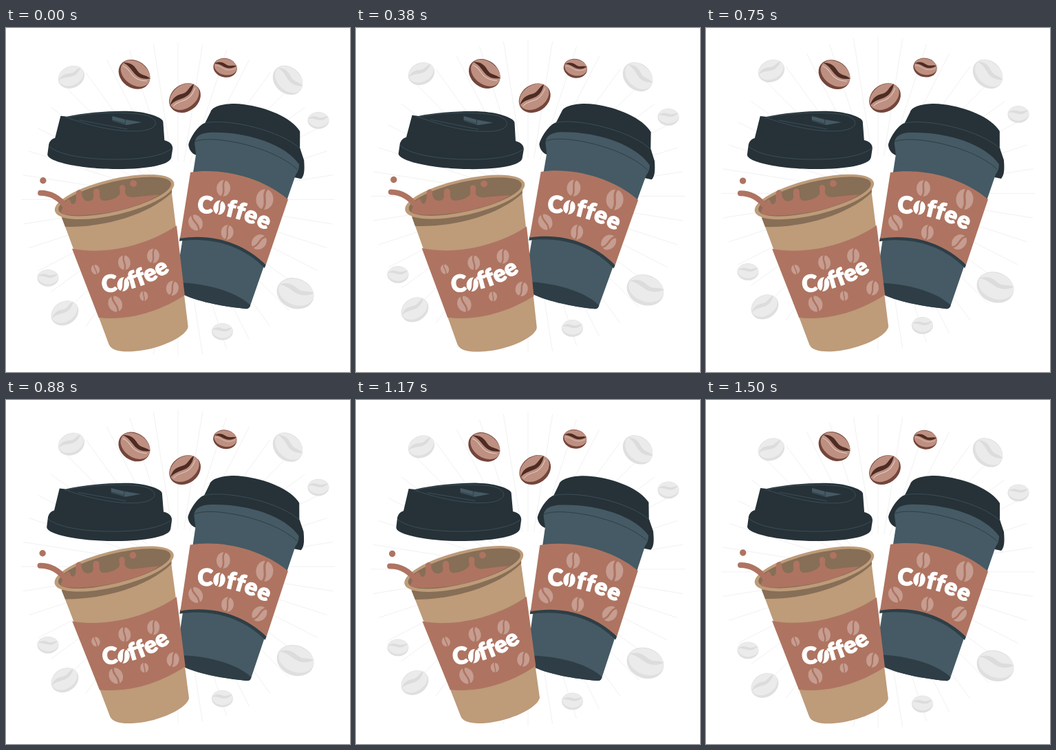
These frames come from a looping animation (500 px wide and 500 px high, 1.54 s). An HTML page:

```html
<!DOCTYPE html>
<html lang="en">
<head>
<meta charset="utf-8">
<title>Coffee cups</title>
<style>
html, body { margin: 0; width: 100%; height: 100%; overflow: hidden; background: #fff; }
svg { display: block; width: 100vw; height: 100vh; }
.brown { --base: #74453a; --face: #be9081; --crease: #4e2c23; --shine: #e3cdc6; }
.grey { --base: #dfdfdf; --face: #ebebeb; --crease: #dcdcdc; --shine: none; }
.lid { fill: #263238; }
.line { fill: none; stroke: #455a64; stroke-width: .7; }
.seam { fill: none; stroke: #263238; stroke-width: .7; }
.sleeve { fill: #ae7461; }
.tan { fill: #be9b79; }
.shade { fill: #876e56; }
.slate { fill: #455a64; }
.deep { fill: #2f3e46; }
text { font: 900 34px Lato, sans-serif; letter-spacing: 1px; fill: #fff; stroke: #fff; stroke-width: 1.2; stroke-linejoin: round; }
</style>
</head>
<body>
<svg viewBox="0 0 500 500">
  <defs>
    <g id="bean">
      <ellipse rx="25" ry="20" fill="var(--base)"/>
      <ellipse cx=".5" cy="-2" rx="24" ry="17" fill="var(--face)"/>
      <path d="M-24-4C-14-12-7-10 1-7S14-10 23-9C17-3 9 1 0-1S-14-6-24-4Z" fill="var(--crease)"/>
      <path d="M-21 0C-13-3-7 2 1 3S15 1 21-3" fill="none" stroke="var(--shine)"/>
    </g>
    <path id="slateBaseline" d="M278 269C315 269 345 277 390 299"/>
    <path id="tanBaseline" d="M140 384C180 383 215 372 252 343"/>
  </defs>

  <g id="backdrop" class="grey">
    <path id="rays" stroke="#f1f1f1"/>
    <use href="#bean" transform="translate(95 72) rotate(-25) scale(.79)"/>
    <use href="#bean" transform="translate(409.5 76.5) rotate(42) scale(.95)"/>
    <use href="#bean" transform="translate(454 135) scale(.62)"/>
    <use href="#bean" transform="translate(61 364) scale(.62)"/>
    <use href="#bean" transform="translate(85.5 415) rotate(-32) scale(.84)"/>
    <use href="#bean" transform="translate(314.5 442) scale(.62)"/>
    <use href="#bean" transform="translate(420.5 386.5) rotate(20) scale(1.1)"/>
  </g>

  <g id="slateCup">
    <path class="lid" d="M297 122C300 112 325 108 345 111C378 115 415 130 427 150V174L433 192C434 205 434 214 429 219L415 216L280 186C272 185 266 179 265 170C267 160 279 141 289 138Z"/>
    <path class="line" d="M289 138C325 131 402 150 428 176"/>
    <path class="slate" d="M274 168C274 158 282 153 295 152C348 150 405 168 426 198Q426 207 421 213L355.500 403Q354 409 348 408C315 405 275 397 255 386L246 376L276 184Z"/>
    <path class="seam" d="M275 165C296 155 385 170 423 205"/>
    <path class="deep" d="M246 370C300 371 340 387 355.500 403Q354 409 348 408C315 405 275 397 255 386Z"/>
    <path class="deep" d="M253 304C300 298 345 312 378 344L376 349C345 317 300 303 252 310Z"/>
    <path class="sleeve" d="M268 210C310 203 370 215 410 249L378 344C345 312 300 298 253 306Z"/>
    <text><textPath href="#slateBaseline">C<tspan dx="18">ffee</tspan></textPath></text>
  </g>

  <g id="tanCup">
    <path class="lid" d="M79 128L88 129C115 123 155 120 180 121C208 122 228 131 228 136L230 163C238 165 242 169 242 175L240 188C238 199 205 205 160 205C110 205 60 195 60 184L62 169Q64 162 71 160Z"/>
    <path class="line" d="M62 172C78 186 120 191 160 191S228 185 241 175M86 131C120 122 180 121 204 127C222 133 222 145 200 149C160 154 110 138 90 131M106 134L176 147"/>
    <path class="slate" d="M154 128L173 133L197 137L175 141L154 135Z"/>
    <path class="seam" d="M154 134L173 139V133"/>
    <path class="tan" d="M80 273L150 460C154 470 172 472 195 469C230 464 263 447 265 434L240 233Z"/>
    <path class="shade" d="M81 276L86 289C140 290 205 273 241 239V232Z"/>
    <ellipse class="tan" cx="157.500" cy="245.500" rx="89" ry="26" transform="rotate(-13.5 157.5 245.5)"/>
    <ellipse class="shade" cx="158" cy="245" rx="84" ry="21.500" transform="rotate(-13.5 158 245)"/>
    <path class="sleeve" d="M80 267C84 258 86 250 91 249C95 250 93 257 98 256C104 254 101 243 102 239C103 234 110 234 110 239C110 251 118 254 125 250C129 247 126 241 127 238A4.500 4.500 0 0 1 136 238C136 246 136 250 142 251C150 251 160 248 165 242C167 238 163 232 166 229C170 226 175 230 173 236C172 242 176 246 184 246Q200 244 223 242C212 250 190 259 160 266C125 273 92 274 80 270Z"/>
    <path d="M50 240C66 240 78 248 87 260" fill="none" stroke="#ae7461" stroke-width="8" stroke-linecap="round"/>
    <circle class="sleeve" cx="53.700" cy="222" r="4.700"/>
    <circle class="sleeve" cx="185" cy="226" r="5"/>
    <path class="sleeve" d="M96 321C150 331 210 313 248 287L260 388C225 411 180 426 135 421Z"/>
    <text><textPath href="#tanBaseline">C<tspan dx="18">ffee</tspan></textPath></text>
  </g>

  <g id="beans" class="brown">
    <use href="#bean" transform="translate(186.5 67.5) rotate(36) scale(.98)"/>
    <use href="#bean" transform="translate(260 101.7) rotate(-36) scale(.98)"/>
    <use href="#bean" transform="translate(318.5 57.7) rotate(12) scale(.69)"/>
  </g>
</svg>
<script>
const LOOP = 1540, LEAD = 50;
const find = id => document.getElementById(id);

// A flat oval split by an S-shaped gap
const oval = (id, x, y, r, tilt, fill = '#c69d90') => find(id).insertAdjacentHTML('beforeend',
  `<g transform="translate(${x} ${y}) rotate(${tilt}) scale(${r / 10} ${r / 8.4})">
    <ellipse rx="10" ry="10" fill="${fill}"/>
    <path d="M2-11C-5-4 5 3-2 11" fill="none" stroke="#ae7461" stroke-width="2.6"/></g>`);

// Evenly spaced ovals between two ends, each given as x, y, tilt
const row = (id, from, to, radii) => radii.forEach((r, i) => {
  const [x, y, tilt] = from.map((v, k) => v + (to[k] - v) * i / (radii.length - 1));
  oval(id, x, y, r, tilt);
});

row('slateCup', [316, 233, 5], [376, 249, 5], [10, 12.5]);
row('slateCup', [275.5, 283, -30], [368, 311, 45], [10, 9, 10]);
row('tanCup', [130, 351, -20], [214, 331, 5], [6, 9, 9]);
row('tanCup', [159, 401, -25], [242, 378, 10], [10, 6, 9]);
oval('slateCup', 310, 261, 8.7, 12, '#fff');
oval('tanCup', 170.5, 372.5, 8.7, 10, '#fff');

let rays = '';
for (let i = 0; i < 40; i++) {
  const point = r => `${250 + r * Math.cos(i * Math.PI / 20)} ${250 + r * Math.sin(i * Math.PI / 20)}`;
  rays += `M${point(55)}L${point(228)}`;
}
find('rays').setAttribute('d', rays);

// Triangle wave: 0 at phase 0, 1 at a quarter, -1 at three quarters
const triangle = p => 1 - 4 * Math.abs((p + .25) % 1 - .5);
const pivots = { slateCup: '341 259', tanCup: '155 295', beans: '250 83' };

function draw() {
  const phase = (performance.now() + LEAD) % LOOP / LOOP;
  const lift = 10 * (1 - Math.abs(2 * phase - 1));
  find('backdrop').setAttribute('transform', `translate(0 ${-lift})`);
  for (const id in pivots)
    find(id).setAttribute('transform', `rotate(${triangle(phase)} ${pivots[id]})`);
  requestAnimationFrame(draw);
}
draw();
</script>
</body>
</html>
```
